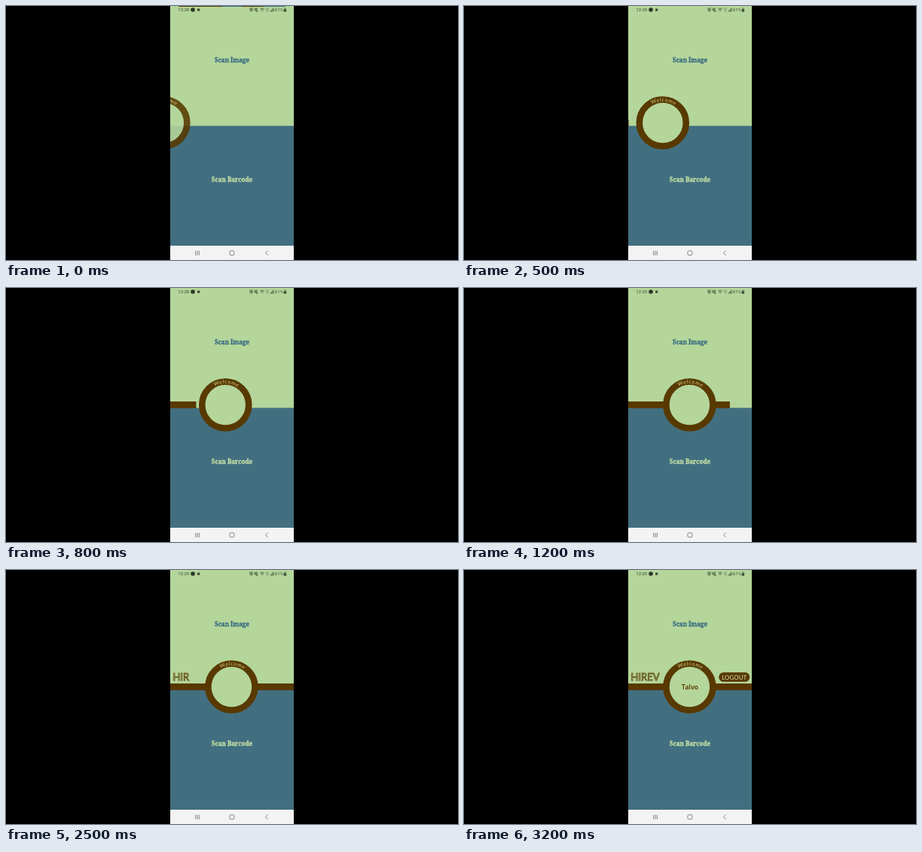
These frames come from a looping animation (600x338 px, 3300 ms). An HTML page:

```html
<!DOCTYPE html>
<html lang="en">
<head>
<meta charset="utf-8">
<title>Scan menu</title>
<style>
  html, body { margin: 0; width: 100%; height: 100%; overflow: hidden; background: #000; }
  svg { display: block; width: 100vw; height: 100vh; }
  .middle { text-anchor: middle; }
  .slab { font: 900 8px "Noto Serif", serif; stroke-width: .3; }
  .status { font: 6px Roboto, sans-serif; fill: #3c4a35; }
  .icon { fill: none; stroke: #3c4a35; stroke-width: .8; }
  .nav { fill: none; stroke: #666; stroke-width: .8; }
  .brown { fill: #583900; }
</style>
</head>
<body>
<svg viewBox="0 0 600 338">
  <defs>
    <clipPath id="screen"><rect x="218" width="164" height="338"/></clipPath>
    <path id="arc" d="M-28.6 0A28.6 28.6 0 0 1 28.6 0"/>
  </defs>
  <rect width="600" height="338"/>
  <g clip-path="url(#screen)">
    <rect x="218" width="164" height="160" fill="#b4d69a"/>
    <rect x="218" y="159.5" width="164" height="160" fill="#426f80"/>
    <rect x="218" y="319" width="164" height="19" fill="#f3f3f3"/>

    <g id="edge">
      <path class="brown" d="M229 0h58v1h-58zM313 0h29v1h-29z"/>
      <path fill="#426f80" d="M287 0h26v1h-26zM342 0h29v1h-29z"/>
    </g>

    <text id="clock" class="status" x="228.3" y="7.2"></text>
    <circle cx="248" cy="5" r="2.8" fill="#2c3627"/>
    <rect x="254" y="3.5" width="3.2" height="3.2" fill="#3c4a35"/>
    <g class="icon">
      <circle cx="325.5" cy="5.2" r="1.8"/>
      <path d="M323 3.3l1.3-1.1M328 3.3l-1.3-1.1M325.5 4v1.4h1"/>
      <path d="M330 4.2h1.2l2-1.6v5l-2-1.6H330zM329.7 2.5l5 5"/>
      <path d="M337.2 4.2q2.8-2.4 5.6 0M338.4 5.6q1.6-1.3 3.2 0M339.6 7h.9"/>
      <path d="M345 3.2h1.4M347.4 3.2h1.4M345.2 5h3.2M346 7h1.6" stroke-width=".6"/>
      <path d="M351 7.5V6.2M352.4 7.5V5M353.8 7.5V3.6M355.1 7.5V2.4"/>
      <path d="M369.4 4.8V3.4q1-1.5 2 0v1.4"/>
    </g>
    <text class="status" x="356.8" y="7.2">61%</text>
    <rect x="368.7" y="4.4" width="3.4" height="3.2" fill="#3c4a35"/>

    <g class="middle slab">
      <text x="300" y="75" fill="#386b80" stroke="#386b80">Scan Image</text>
      <text x="300" y="234.4" fill="#c3dfa5" stroke="#c3dfa5">Scan Barcode</text>
    </g>

    <rect id="bar" class="brown" x="218" y="151" height="9"/>
    <g id="ring">
      <circle r="31" fill="#b4d69a" stroke="#583900" stroke-width="8.6"/>
      <text class="middle" fill="#d8cf8c" style="font: 6.8px Lato, sans-serif; letter-spacing: .7px">
        <textPath href="#arc" startOffset="51.5%">Welcome</textPath>
      </text>
    </g>

    <text id="brand" x="221.5" y="147" fill="none" stroke="#583900" stroke-width=".75"
          style="font: 13px Lato, sans-serif"></text>
    <g id="account">
      <text class="middle brown" x="299.8" y="159" style="font: 600 8.6px Inter, sans-serif">Talvo</text>
      <rect class="brown" x="338.3" y="136.2" width="41" height="12.6" rx="6.3"/>
      <text class="middle" x="358.8" y="145.8" fill="#d5dfae" style="font: 8px Lato, sans-serif">LOGOUT</text>
    </g>

    <g class="nav">
      <path d="M251.7 325.8v6M254 325.8v6M256.3 325.8v6M347.6 325.7l-3 3 3 3"/>
      <rect x="296.9" y="325.7" width="6" height="6" rx="2"/>
    </g>
  </g>
</svg>
<script>
  const LOOP = 3300, STEP = 100, BRAND = "HIREV";
  const el = id => document.getElementById(id);
  const [edge, clock, bar, ring, brand, account] =
    ["edge", "clock", "bar", "ring", "brand", "account"].map(el);

  const progress = (t, start, length) => Math.min(1, Math.max(0, (t - start) / length));
  const easeInOut = p => p < .5 ? 2 * p * p : 1 - 2 * (1 - p) ** 2;
  const slide = (t, start, length) => easeInOut(progress(t, start, length));

  function draw(t) {
    edge.setAttribute("visibility", t < STEP ? "visible" : "hidden");
    clock.textContent = t < 900 ? "12:28" : "12:29";

    const x = 201.2 + 98.2 * slide(t, -275, 1350);
    ring.setAttribute("transform", `translate(${x} 155.5)`);
    ring.setAttribute("opacity", .88 + .12 * progress(t, 0, 200));
    bar.setAttribute("width", 164 * slide(t, 457, 1058));

    const letters = Math.max(0, Math.floor((t - 2200) / STEP));
    brand.textContent = BRAND.slice(0, letters);
    account.setAttribute("opacity", progress(t, 2550, 550));
  }

  // The picture advances at ten steps per second.
  const began = performance.now();
  function tick() {
    const t = (performance.now() - began) % LOOP;
    draw(Math.floor(t / STEP) * STEP);
    requestAnimationFrame(tick);
  }
  tick();
</script>
</body>
</html>
```
